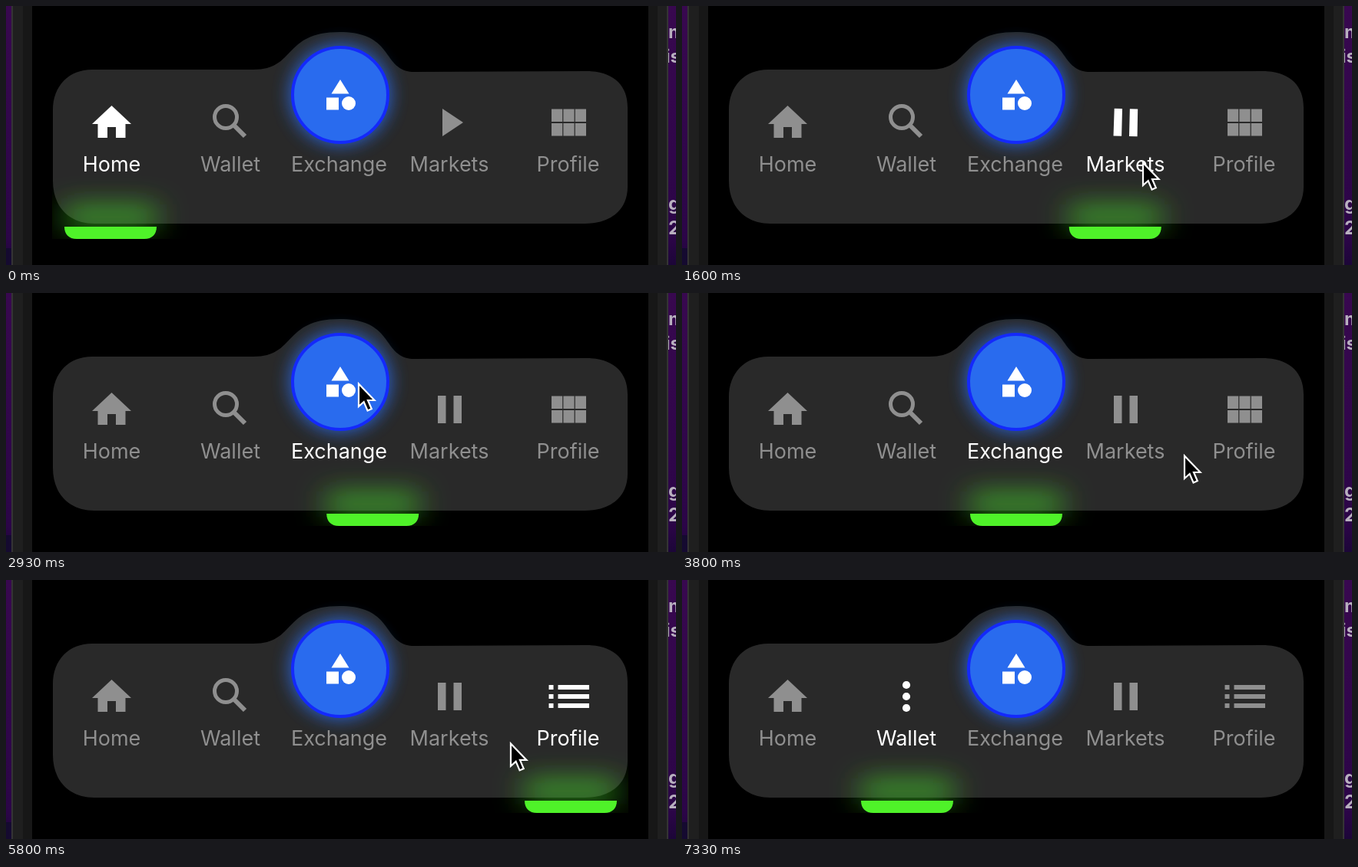
Recreate the animation shown at these times as an HTML page. Size 872 by 338 pixels, loop 7870 ms.

```html
<!DOCTYPE html>
<html lang="en">
<head>
<meta charset="utf-8">
<title>Tab bar</title>
<style>
  html, body { margin: 0; width: 100%; height: 100%; overflow: hidden; background: #000; }
  svg { display: block; width: 872px; height: 338px; }
  text { font-family: Inter, Roboto, sans-serif; }
  .label { font-size: 27px; text-anchor: middle; }
  .side { font-size: 24px; font-weight: 700; fill: #b8b0bf; }
  .tab { fill: #8f8f8f; stroke: #8f8f8f; }
  .tab.on { fill: #fff; stroke: #fff; }
  .tab * { stroke-width: 0; }
  .tab .line { fill: none; }
</style>
</head>
<body>
<svg viewBox="0 0 872 338">
  <defs>
    <linearGradient id="purple" x2="0" y2="1">
      <stop offset="0" stop-color="#38084f"/>
      <stop offset=".9" stop-color="#2b0547"/>
      <stop offset="1" stop-color="#1c0638"/>
    </linearGradient>
    <filter id="blueBlur" x="-50%" y="-50%" width="200%" height="200%">
      <feGaussianBlur stdDeviation="11"/>
    </filter>
    <filter id="greenBlur" x="-80%" y="-500%" width="260%" height="1100%">
      <feGaussianBlur stdDeviation="19"/>
    </filter>
    <clipPath id="barClip"><rect x="60" y="30" width="750" height="274"/></clipPath>
    <clipPath id="sideClip"><rect x="862" width="10" height="338"/></clipPath>
  </defs>

  <rect width="872" height="338" fill="#000"/>
  <rect width="7" height="338" fill="url(#purple)"/>
  <rect y="316" width="7" height="22" fill="#150a30"/>
  <rect x="862" width="10" height="338" fill="url(#purple)"/>
  <rect x="7" width="15" height="338" fill="#1f1f1f"/>
  <rect x="7" width="2" height="338" fill="#343434"/>
  <rect x="22" width="12" height="338" fill="#171717"/>
  <rect x="836" width="12" height="338" fill="#171717"/>
  <rect x="848" width="14" height="338" fill="#1f1f1f"/>
  <rect x="860" width="2" height="338" fill="#343434"/>
  <g class="side" clip-path="url(#sideClip)">
    <text x="862" y="42">m</text>
    <text x="858" y="74">is</text>
    <text x="862" y="266">g</text>
    <text x="862" y="298">2</text>
  </g>

  <path fill="#292929" d="M61 136C61 104 82 83 112 83H322C378 83 360 34 434 34C508 34 488 86 532 86L755 85C790 85 809 103 809 132V236C809 265 788 284 753 284H115C82 284 61 262 61 228Z"/>
  <circle cx="435" cy="116" r="66" fill="#2a6ef0" opacity=".8" filter="url(#blueBlur)"/>
  <circle cx="435" cy="116" r="62" fill="#296bee" stroke="#1429fb" stroke-width="4"/>
  <path fill="#fff" d="M435 96L446.500 114.500H423.500ZM417 119.500H433V135.500H417Z"/>
  <circle cx="446" cy="127" r="9" fill="#fff"/>

  <g clip-path="url(#barClip)">
    <g id="marker">
      <rect y="267" width="120" height="17" fill="#4ef52a" filter="url(#greenBlur)"/>
      <path fill="#4ff229" d="M0 288H120C120 298 114 304 104 304H16C6 304 0 298 0 288Z"/>
    </g>
  </g>

  <g class="tab">
    <path d="M137.500 130L163 154H155.500V172H143V158H132V172H119.500V154H112Z"/>
    <text class="label" x="137.500" y="216">Home</text>
  </g>
  <g class="tab">
    <circle id="ring" class="line"/>
    <path id="handle" class="line"/>
    <circle id="dotTop" cx="292"/>
    <circle id="dotLow" cx="292"/>
    <text class="label" x="292" y="216">Wallet</text>
  </g>
  <g class="tab"><text class="label" x="433.500" y="216">Exchange</text></g>
  <g class="tab">
    <path id="play"/>
    <text class="label" x="577" y="216">Markets</text>
  </g>
  <g class="tab">
    <path id="list"/>
    <text class="label" x="731.500" y="216">Profile</text>
  </g>

  <path id="cursor" d="M1 1.500V31L7.700 25L12.600 36.500L17.800 34.200L13 23H21.500Z" fill="#000" stroke="#fff" stroke-width="2.200"/>
</svg>
<script>
const LOOP = 7870, SLIDE = 1000, MORPH = 550;
const $ = id => document.getElementById(id);
const tabs = [...document.querySelectorAll('.tab')];
const stops = [76, 233, 375, 517, 675];
const taps = [
  { at: -2000, tab: 0 },
  { at: 1138, tab: 3 },
  { at: 2761, tab: 2 },
  { at: 4530, tab: 4 },
  { at: 6353, tab: 1 }
];

const clamp = v => Math.min(1, Math.max(0, v));
const span = (t, a, b) => clamp((t - a) / (b - a));
const mix = (a, b, p) => a + (b - a) * p;
const smooth = p => p * p * (3 - 2 * p);
const outQuad = p => 1 - (1 - p) ** 2;
const inOutCubic = p => p < .5 ? 4 * p ** 3 : 1 - 4 * (1 - p) ** 3;

// cubic-bezier(.19, 1, .22, 1)
function outExpo(x) {
  let lo = 0, hi = 1;
  for (let i = 0; i < 24; i++) {
    const s = (lo + hi) / 2, r = 1 - s;
    if (.57 * r * r * s + .66 * r * s * s + s ** 3 < x) lo = s; else hi = s;
  }
  return 1 - (1 - hi) ** 3;
}

const SHOW = 100, HIDE = 7000;
const moves = [
  { a: 100, b: 800, from: [560, 285], to: [599, 203], ease: smooth },
  { a: 1960, b: 2600, from: [599, 203], to: [458, 117], ease: smooth },
  { a: 3050, b: 3800, from: [458, 117], to: [653, 211], ease: outQuad },
  { a: 3800, b: 4330, from: [653, 211], to: [714, 213], ease: smooth },
  { a: 5640, b: 6330, from: [714, 213], to: [293, 205], ease: smooth }
];

function drawCursor(t) {
  const m = moves.filter(m => m.a <= t).pop() || moves[0];
  const p = m.ease(span(t, m.a, m.b));
  const [x, y] = [0, 1].map(i => mix(m.from[i], m.to[i], p));
  $('cursor').setAttribute('transform', `translate(${x} ${y})`);
  $('cursor').setAttribute('visibility', t >= SHOW && t < HIDE ? 'visible' : 'hidden');
}

const set = (id, attrs) => {
  for (const k in attrs) $(id).setAttribute(k, attrs[k]);
};

const triangleHalf = [[-18, 9.5], [0, -17.5], [0, -17.5], [0, 9.5]];
const pauseBar = [[-15.5, 18], [-15.5, -18], [-5, -18], [-5, 18]];

function drawPlay(p) {
  const k = inOutCubic(p);
  const half = side => 'M' + triangleHalf.map(([x, y], i) =>
    side * mix(x, pauseBar[i][0], k) + ' ' + mix(y, pauseBar[i][1], k)).join('L') + 'Z';
  set('play', {
    d: half(1) + half(-1),
    transform: `translate(577.5 152) rotate(${90 * (1 - k)})`
  });
}

// Grid cells stretch into bullets and bars, then the whole icon turns.
function drawList(p) {
  const k = smooth(span(p, 0, .45));
  const turn = smooth(span(p, .4, 1));
  const cell = (x0, x1, y, h) => `M${x0} ${y}H${x1}V${y + h}H${x0}Z`;
  let d = '';
  for (let i = 0; i < 3; i++) {
    const y = mix(-22.5 + 15.4 * i, -15 + 12 * i, k), h = mix(14.2, 6, k);
    d += cell(mix(-17.5, -26, k), mix(-1, -20, k), y, h);
    d += cell(mix(1, -14, k), mix(17.5, 26.5, k), y, h);
  }
  set('list', { d, transform: `translate(732.5 152) rotate(${-90 * (1 - turn)})` });
}

function drawSearch(p) {
  const k = inOutCubic(p);
  set('ring', {
    cx: mix(286, 292, k), cy: mix(145, 152, k), r: mix(14.5, 2.5, k),
    style: `stroke-width:${mix(5, 5.2, k)}px`
  });
  const end = mix(1, 0, k);
  set('handle', {
    d: `M${mix(296, 292, k)} ${mix(155, 152, k)}l${15 * end} ${15 * end}`,
    style: `stroke-width:${6 * end}px`
  });
  const r = 5.1 * span(k, .15, 1);
  set('dotTop', { cy: mix(150, 137, k), r });
  set('dotLow', { cy: mix(158, 167, k), r });
}

function draw(t) {
  const n = taps.filter(s => s.at <= t).length - 1;
  const now = taps[n], before = taps[Math.max(0, n - 1)];
  const x = mix(stops[before.tab], stops[now.tab], outExpo(clamp((t - now.at) / SLIDE)));
  set('marker', { transform: `translate(${x} 0)` });
  tabs.forEach((el, i) => el.classList.toggle('on', i === now.tab));

  const morph = tab => clamp((t - taps.find(s => s.tab === tab).at) / MORPH);
  drawSearch(morph(1));
  drawPlay(morph(3));
  drawList(morph(4));
  drawCursor(t);
}

const start = performance.now();
function tick() {
  draw((performance.now() - start) % LOOP);
  requestAnimationFrame(tick);
}
tick();
</script>
</body>
</html>
```
